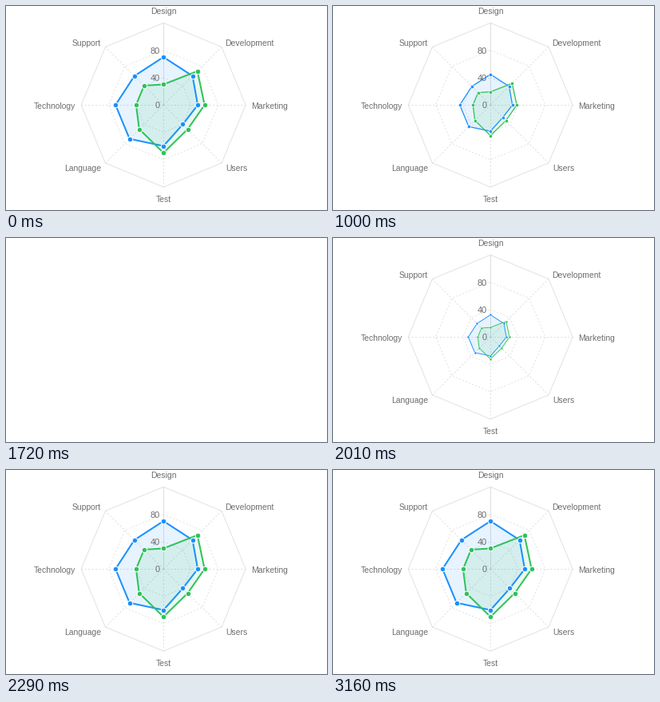
A matplotlib script for the animation above (3620 ms loop, 402 px wide and 256 px high).

```python
import numpy as np
import matplotlib.pyplot as plt
from matplotlib.animation import FuncAnimation
from matplotlib.patches import Polygon

W, H, DPI = 402, 256, 64
PT = 72 / DPI                    # points per pixel
LOOP, TICK = 3620, 10            # ms
CX, CY, RADIUS, MAX_SCORE = 197.2, 124.2, 103, 120
GROW = 450                       # ms for the shapes to reach full size

SERIES = [
    ("#1890ff", [70, 60, 50, 40, 60, 70, 70, 60]),
    ("#2fc25b", [30, 70, 60, 50, 70, 50, 40, 40]),
]
LABELS = [
    ("Design", 197, 10.3, "center"), ("Development", 274.6, 50, "left"),
    ("Marketing", 307.2, 129, "left"), ("Users", 274.8, 206.7, "left"),
    ("Test", 197, 246.5, "center"), ("Language", 119, 206.7, "right"),
    ("Technology", 86.8, 129, "right"), ("Support", 119, 50, "right"),
]

# Each redraw: the clear, then the visible growth steps; start is when growth begins.
REDRAWS = [
    (712, [660, 770, 830, 890, 940, 1000, 1060, 1120, 1180]),
    (1802, [1720, 1840, 1900, 1950, 2010, 2070, 2120, 2180, 2240, 2290]),
]
POINTER_PATH = [
    (2530, (19, 179)), (2580, (104, 217.5)), (2760, (155.5, 211.5)),
    (2810, (225, 216)), (2870, (295, 231)), (2930, (347, 245)),
    (3110, (347, 251)), (3160, None),
]
POINTER_SHAPE = np.array([
    (0, 0), (0, 14.3), (3.3, 11.2), (5.7, 16.6), (8.2, 15.5), (5.9, 10.3), (10.3, 10.3),
])

angles = np.arange(8) * np.pi / 4
spokes = np.column_stack([np.sin(angles), -np.cos(angles)])


def ring(scores):
    """Corner points for one score per spoke."""
    radii = np.broadcast_to(np.asarray(scores, float), 8) * RADIUS / MAX_SCORE
    return np.array([CX, CY]) + spokes * radii[:, None]


def closed(points):
    return np.vstack([points, points[:1]])


fig = plt.figure(figsize=(W / DPI, H / DPI), dpi=DPI, facecolor="white")
ax = fig.add_axes([0, 0, 1, 1])
ax.set_xlim(0, W)
ax.set_ylim(H, 0)
ax.axis("off")


def grid_line(points, color="#e2e2e2", dashed=False):
    style = (0, (2 * PT, 2.4 * PT)) if dashed else "-"
    line, = ax.plot(*np.transpose(points), color=color, lw=PT, ls=style, zorder=1)
    line.set_dash_capstyle("butt")
    if dashed:
        line.set_linestyle((0, (2, 2.4)))


def text(label, x, y, align, size):
    ax.text(x, y, label, ha=align, va="baseline", fontsize=size * PT,
            family="Liberation Sans", color="#6e6e6e", zorder=6)


for i, corner in enumerate(ring(MAX_SCORE)):
    grid_line([(CX, CY), corner], "#dedede", dashed=i > 0)
for score in (40, 80):
    grid_line(closed(ring(score)), dashed=True)
grid_line(closed(ring(MAX_SCORE)))

for label, x, y, align in LABELS:
    text(label, x, y, align, 10.35)
for score in (0, 40, 80):
    text(str(score), 193.2, CY + 4 - score * RADIUS / MAX_SCORE, "right", 11)

shapes = []
for color, scores in SERIES:
    area = ax.add_patch(Polygon(ring(scores), fc=color, ec="none", alpha=0.1, zorder=2))
    line, = ax.plot([], [], color=color, solid_joinstyle="round", zorder=3)
    dots, = ax.plot([], [], "o", mfc=color, mec="white", zorder=4)
    shapes.append((np.array(scores), area, line, dots))

pointer = ax.add_patch(Polygon(POINTER_SHAPE, fc="black", ec="white", lw=PT, zorder=9))


def chart_scale(now):
    """Size of the shapes from 0 to 1, or None while the stage is clear."""
    for start, steps in reversed(REDRAWS):
        if now >= steps[0]:
            shown = steps[np.searchsorted(steps, now, side="right") - 1]
            if shown == steps[0]:
                return None
            return 1 if shown == steps[-1] else min(1, (shown - start) / GROW)
    return 1


def pointer_tip(now):
    tip = None
    for moment, place in POINTER_PATH:
        if now >= moment:
            tip = place
    return tip


def update(frame):
    now = frame * TICK
    scale = chart_scale(now)
    ax.set_visible(scale is not None)
    if scale is not None:
        for scores, area, line, dots in shapes:
            points = ring(scores * scale)
            area.set_xy(points)
            line.set_data(*closed(points).T)
            line.set_linewidth(2 * scale * PT)
            dots.set_data(*points.T)
            dots.set_markersize(6.6 * scale * PT)
            dots.set_markeredgewidth(scale * PT)
    tip = pointer_tip(now)
    pointer.set_visible(tip is not None)
    if tip is not None:
        pointer.set_xy(POINTER_SHAPE + tip)
    return []


animation = FuncAnimation(fig, update, frames=LOOP // TICK, interval=TICK,
                          repeat=True, repeat_delay=0, blit=False)
plt.show()
```
